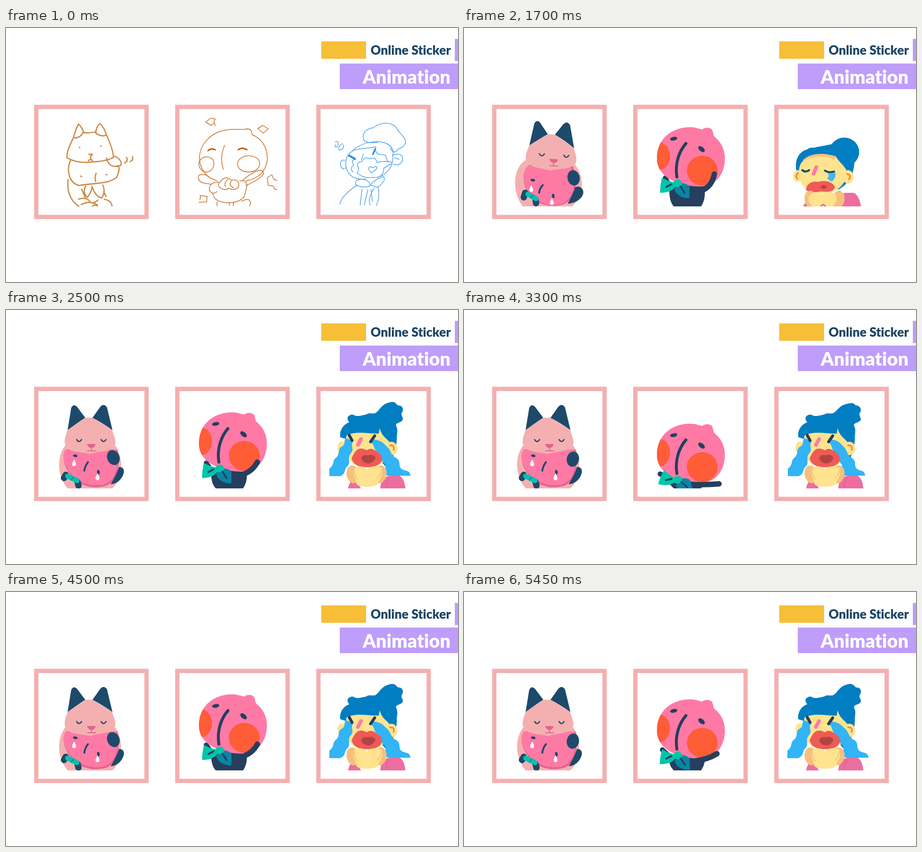
An HTML page with a canvas for the animation above (5.5 s loop, 998 by 561 pixels).

```html
<!DOCTYPE html>
<html lang="en">
<head>
<meta charset="utf-8">
<title>Online Sticker Animation</title>
<style>
html, body { margin: 0; width: 100%; height: 100%; overflow: hidden; background: #fff; }
svg, canvas { position: absolute; left: 0; top: 0; width: 100%; height: 100%; display: block; }
text { font-family: Lato, "Open Sans", sans-serif; font-weight: 900; font-variant-ligatures: none; text-anchor: end; }
</style>
</head>
<body>
<svg viewBox="0 0 998 561">
  <path fill="#f7be38" d="M696 29.500H795V68H696Z"/>
  <path fill="#be9dfb" d="M737 78.500H998V135H737ZM991 24H998V73H991Z"/>
  <text x="982" y="58.500" font-size="27.800" fill="#1c4666">Online Sticker</text>
  <text x="981.500" y="123" font-size="41.200" fill="#fff">Animation</text>
  <g fill="none" stroke="#f4b0b0" stroke-width="9.500">
    <rect x="66.800" y="174.300" width="243.500" height="243"/>
    <rect x="378.300" y="174.300" width="243.500" height="243"/>
    <rect x="689.800" y="174.300" width="243.500" height="243"/>
  </g>
</svg>
<canvas></canvas>
<script>
const LOOP = 5500, STEP = 50, CYCLE = 2000;
const INK = '#1d4a6b', NAVY = '#263f5e', SKIN = '#f4b0b0', PEACH = '#fe7aa5', ROSE = '#e2638f',
  CHEEK = '#ff5c38', TEAL = '#00c6a9', SEA = '#0786a3', HAIR = '#007ec1', FACE = '#ffe38e',
  TAN = '#f6c07c', LIP = '#ef5a55', MAROON = '#b14442', TEAR = '#32b4f6', EAR = '#f4873c',
  DRESS = '#ec6ea0';

const canvas = document.querySelector('canvas');
const ctx = canvas.getContext('2d');
const ratio = window.devicePixelRatio || 1;
canvas.width = 998 * ratio;
canvas.height = 561 * ratio;
let outline = false;

const lerp = (a, b, t) => a + (b - a) * t;

// Eased value from [time, value] pairs
function track(keys, t) {
  let i = 0;
  while (i < keys.length - 1 && t >= keys[i + 1][0]) i++;
  if (i === keys.length - 1) return keys[i][1];
  const [t0, a] = keys[i], [t1, b] = keys[i + 1];
  const u = Math.max(0, (t - t0) / (t1 - t0));
  return lerp(a, b, u * u * (3 - 2 * u));
}

// Blend two paths with the same commands
function mix(a, b, t) {
  const to = b.match(/-?[\d.]+/g);
  let i = 0;
  return a.replace(/-?[\d.]+/g, n => lerp(+n, +to[i++], t).toFixed(2));
}

function fill(d, color) {
  const p = d instanceof Path2D ? d : new Path2D(d);
  ctx.fillStyle = outline ? '#fff' : color;
  ctx.fill(p);
  if (outline) {
    ctx.strokeStyle = color;
    ctx.lineWidth = 2;
    ctx.stroke(p);
  }
}

function line(d, color, width) {
  ctx.strokeStyle = color;
  ctx.lineWidth = width;
  ctx.stroke(new Path2D(d));
}

function oval(x, y, rx, ry, color, rot = 0) {
  const p = new Path2D();
  p.ellipse(x, y, rx, ry, rot, 0, 7);
  fill(p, color);
}

function group(draw, x = 0, y = 0, rot = 0, cx = 0, cy = 0) {
  ctx.save();
  ctx.translate(x + cx, y + cy);
  ctx.rotate(rot * Math.PI / 180);
  ctx.translate(-cx, -cy);
  draw();
  ctx.restore();
}

const drop = (x, y) =>
  fill(`M${x} ${y - 8}C${x + 3} ${y - 2} ${x + 5} ${y + 1} ${x + 4} ${y + 4}C${x + 3} ${y + 8} ${x - 3} ${y + 8} ${x - 4} ${y + 4}C${x - 5} ${y + 1} ${x - 3} ${y - 2} ${x} ${y - 8}Z`, '#fff');

function catHead(turn) {
  fill('M176 238L191 238L234 264C238 278 246 290 239 301C228 314 206 311 186 318C158 313 140 313 132 301C126 290 132 278 136 264Z', SKIN);
  fill('M136 265L144 216Q149 206 157 214L175 238Q158 249 136 265Z', INK);
  fill('M235 265L223 215Q216 205 208 214L191 238Q212 249 235 265Z', INK);
  group(() => {
    line('M156 286Q161 295 167 286M210 286Q215 295 221 286', INK, 2.600);
    fill('M179 296L198 296Q196 304 189 305Q181 304 179 296Z', ROSE);
    line('M188.500 304L188.500 310M180 311L198 311', ROSE, 2);
  }, 4 * turn, -5 * turn);
}

function cat(p) {
  const e = track([[200, 0], [300, 0.200], [550, 1]], p);
  const rot = track([[0, 0], [200, 3.500], [300, 6], [400, 4.500], [550, 0]], p);
  const x = track([[0, 2], [200, 5], [300, 5.500], [550, 0]], p);
  const y = track([[0, -6], [200, -3], [300, -1.500], [550, 0]], p);
  const turn = track([[0, 0.500], [200, 0.800], [300, 1], [550, 0]], p);
  const breath = p > 1150 && p < 1750 ? -Math.sin((p - 1150) / 600 * Math.PI) : 0;
  const pat = (1 - Math.cos((p - 1000) / 583 * Math.PI * 2)) / 2;
  const at = (a, b) => lerp(a, b, e);

  group(() => {
    fill(mix('M136 292C108 308 104 362 131 396L235 396C266 378 270 322 238 294Z',
      'M134 296C112 316 110 368 138 396L232 396C260 376 260 322 240 298Z', e), SKIN);
    fill(mix('M146 302C128 310 126 345 145 368C160 390 192 398 220 389C247 378 253 345 240 304Z',
      'M133 308C123 316 126 345 142 363C160 388 190 397 222 388C247 376 252 345 246 308Z', e), ROSE);
    fill(mix('M144 304C128 314 128 345 146 366C160 386 190 395 212 389C242 380 250 345 236 308Z',
      'M131 309C124 318 127 345 144 362C160 382 190 391 214 386C244 378 250 345 243 308Z', e), PEACH);
    oval(at(152, 153), at(336, 322), 5, 2.800, INK, 0.200);
    oval(at(197, 204), at(371, 358), 3, 5, INK, -0.200);
    line(mix('M174 347Q167 354 166 364', 'M181 336Q174 345 173 355', e), INK, 4);
    drop(at(148.500, 150.500), at(355, 338));
    drop(at(194, 202), at(384, 369));
  }, 0, breath);

  group(() => catHead(turn), x, y + breath, rot, 185, 318);

  fill(mix('M229 388C235 376 243 362 245 352C256 346 266 356 263 367C259 378 246 387 229 388Z',
    'M231 385C236 376 245 362 249 347C258 345 263 354 259 363C254 376 244 384 231 385Z', e), INK);
  oval(at(242, lerp(237, 241, pat)), at(331, lerp(326, 330, pat)), 13.500, 17, INK, lerp(-0.400, 0.300, pat) * e - 0.200 * (1 - e));
  line(mix('M135 364L132 374M158 379L159 387', 'M132 364L128 371M158 380L160 388', e), INK, 14);
  line(mix('M141 367L159 377', 'M136 367L157 377', e), '#0bbfae', 11);
  line(mix('M147 375Q149 371 153 370', 'M144 376Q146 371 150 370', e), SEA, 2);
}

function peach(p) {
  const q = p % 1000;
  const d = track([[0, 0], [100, -7], [200, -7], [300, 2], [500, 20], [650, 28], [800, 25], [950, 11], [1000, 0]], q);
  const flap = track([[200, 0], [300, 9], [500, 15], [800, 16], [1000, 0]], q);
  const k = d / 25;
  fill(`M453 ${358 + d}C453 385 460 390 465 396L522 396C531 384 534 370 530 ${352 + d}L475 ${340 + d}Z`, NAVY);
  line(mix('M442 338L456 358', 'M433 362L456 374', k), NAVY, 11);
  group(() => {
    const head = new Path2D('M426 295C426 250 460 226 500 226C512 226 519 230 526 231C532 226 542 226 547 231C551 236 549 242 553 247C568 259 576 275 576 295C576 330 555 357 522 357C480 357 426 340 426 295Z');
    fill(head, PEACH);
    ctx.save();
    ctx.clip(head);
    oval(429, 290, 26, 31, CHEEK);
    oval(526, 322, 34, 33, CHEEK);
    ctx.restore();
    oval(463, 251.500, 8, 4, NAVY, -0.200);
    oval(524.500, 274.500, 8.500, 5, NAVY, 0.700);
    line('M490 262C476 278 465 305 470 336', NAVY, 6.500);
  }, 0, d);
  line(mix('M520 364Q544 357 555 336', 'M495 385Q530 387 563 384', k), NAVY, 12);
  group(() => {
    fill('M466 348C452 346 444 341 437 338C434 350 433 360 433 371C448 371 460 367 468 356Z', TEAL);
    line('M447 358L458 352', NAVY, 4);
  }, 0, d, flap, 472, 350);
  group(() => {
    fill('M476 350C488 349 494 353 498 358C497 366 499 376 497 383C482 383 468 376 464 362Z', SEA);
    oval(472, 350, 9.500, 8.500, TEAL);
    line('M478 357L487 371', NAVY, 4);
  }, 0, d, -flap, 472, 350);
}

function fists(y) {
  oval(766, 368 + y, 14, 20, TAN, -0.200);
  oval(826, 368 + y, 14, 20, TAN, 0.200);
}

function calmWoman(u) {
  fill('M832 396L832 372Q833 365 842 364L860 364Q872 368 877 396Z', DRESS);
  fill('M749 396Q750 386 760 384L766 396Z', ROSE);
  oval(839.500, 274 - 17 * u, 33, 32, HAIR);
  group(() => {
    fill(mix('M734 315C729 290 741 272 758 268C765 262 772 266 778 263C795 260 805 258 815 256L862 292C862 322 850 345 826 357L790 330Z',
      'M734 313C729 288 738 274 750 268C752 254 766 256 774 259C788 255 800 254 815 249L862 280C862 316 850 345 826 357L790 330Z', u), HAIR);
    oval(736.500, 327, 10, 13, FACE);
    oval(848, 329, 12, 15, FACE);
    line('M738 320Q730 326 736 333M844 322Q857 324 850 334', EAR, 3.500);
    fill('M748 292C765 274 798 276 820 283L826 300L748 300Z', TAN);
    fill('M745 297C765 282 798 279 817 290Q821 287 819 281C827 295 836 300 844 313C848 345 822 366 790 366C755 363 738 345 739 318Q740 305 745 297Z', FACE);
    line('M747 314Q754 320 762 314M797 315Q806 321 817 317', INK, 4.500);
    line('M778 307L772 322', PEACH, 8);
    fill(mix('M803 321L820 319C821 328 819 334 812 339Q805 336 802 332L806 327Z',
      'M800 325Q802 312 823 312C834 320 833 332 825 337Q810 342 800 332L806 328Z', u), '#45b5ee');
    if (u > 0.400) fill('M747 318L761 317Q759 329 752 334Q746 330 747 318Z', '#45b5ee');
    fill(mix('M755 357C756 344 769 337 782 340C795 335 814 339 819 351C817 362 803 363 788 361C775 364 758 363 755 357Z',
      'M757 351C757 335 773 329 786 332C800 326 822 336 825 351C825 364 811 371 792 372C774 374 758 364 757 351Z', u), LIP);
    oval(794, 351, 6, 4, MAROON);
  }, 0, -12 * u);
  fists(11);
  fill('M792 368C780 361 765 362 761 374C759 386 766 393 778 396L808 396C822 390 826 377 820 366C808 360 799 361 792 368Z', FACE);
  line('M788 394Q793 386 798 394', ROSE, 3);
}

function cryingWoman(alt) {
  const s = alt ? 3 : 0;
  fill('M755 396Q757 378 770 372L785 396Z', DRESS);
  fill('M826 396Q828 366 850 366L869 366Q880 372 882 396Z', DRESS);
  line('M840 392Q838 377 848 370', ROSE, 2);
  fill(`M738 281C736 264 746 252 758 248C750 239 755 231 766 231C776 237 783 233 795 231C802 226 808 230 815 228C826 222 828 ${206 + s} 852 ${203 + s}C863 203 862 212 869 211C879 ${213 + s} 877 224 873 229C873 236 879 ${239 + s} 875 244C870 250 861 248 861 255C867 265 862 276 863 284C862 308 854 335 838 346L800 300Z`, HAIR);
  oval(741, 304, 9, 14, FACE);
  oval(851, 306, 13, 15, FACE);
  line('M846 299Q859 297 856 309', EAR, 3.500);
  fill('M752 277C775 266 800 274 823 273L825 261C829 278 840 283 846 291C850 325 832 349 796 349C762 347 740 322 752 277Z', FACE);
  group(() => {
    fill('M751 283C744 290 751 297 741 302C732 306 738 318 729 326C720 331 726 343 714 350L714 367L738 367C752 361 745 352 755 344C762 335 752 326 762 316C770 306 759 300 767 290Z', TEAR);
  }, alt ? 1 : 0);
  ctx.save();
  ctx.translate(803, 0);
  ctx.scale(alt ? 0.920 : 1, 1);
  ctx.translate(-803, 0);
  fill('M804 292C816 297 810 307 820 313C831 320 824 331 836 339C841 349 834 360 842 366L893 366C892 350 875 358 870 347C867 338 872 332 858 325C848 319 852 310 838 299Q828 287 812 286Z', TEAR);
  ctx.restore();
  line('M758 277L764 288M814 278L805 291', NAVY, 6.500);
  line('M784 285L777 298', PEACH, 8);
  fill('M763 328C768 317 773 306 784 306Q791 306 796 310Q805 303 815 310C824 315 830 321 831 328C829 342 813 348 796 347C780 347 767 342 763 328Z', LIP);
  fill('M784 328Q787 318 799 321Q810 317 816 326Q812 338 800 339Q788 338 784 328Z', MAROON);
  fists(-5);
  fill('M797 353C790 343 777 344 769 350C763 362 773 372 774 385C780 392 814 392 820 385C825 374 833 365 830 350C820 342 804 344 797 353Z', FACE);
  line('M769 352Q767 362 776 373M829 352Q828 363 820 371', TAN, 2);
}

function woman(p) {
  if (p < 450) calmWoman(track([[0, 0.500], [120, 0], [200, 0], [300, 1], [400, 1.300]], p));
  else cryingWoman(Math.round(p / STEP) % 6 < 2);
}

function sketch() {
  line(`M149 242Q153 226 160 212Q168 220 171 229Q166 242 152 243M198 232Q199 218 207 211Q216 218 222 236Q212 242 198 232M171 231Q185 233 199 229
    M150 240Q132 275 135 287Q160 300 187 296Q220 295 237 286Q238 272 221 234M162 264L163 264M209 261L210 261
    M183 279L191 279L187 283L187 290M182 293Q187 288 191 293
    M143 291C134 310 136 340 161 348C190 342 225 346 244 330C253 312 249 304 246 304M165 327L167 328M221 324L223 324
    M199 321Q195 330 198 339M222 287C225 300 232 308 248 305C260 304 254 289 240 283
    M262 298Q271 293 266 286M274 295Q282 292 279 284
    M137 335C134 365 145 386 165 396M176 349Q168 365 180 374Q190 360 190 350Q199 375 212 375Q220 360 214 347M167 356L176 377
    M160 378Q180 372 186 385Q195 388 203 380M166 390Q185 380 202 391M188 396Q199 386 203 396M217 378Q235 382 234 396M216 362L221 372`, '#cd8b48', 2.800);
  line(`M450 331C415 305 420 252 468 230C490 222 510 224 526 224Q536 221 541 226L544 236C580 250 588 300 560 325C550 332 540 336 530 338M450 331L465 337
    M483 259Q471 285 480 312M459 300C458 325 426 323 426 300C427 279 461 280 459 300M560 300C559 324 512 324 511 300C514 276 561 277 560 300
    M450 331Q442 320 426 325Q421 336 434 342L452 345M522 337Q545 316 562 314Q574 318 564 328Q548 341 529 348
    M473 340Q484 324 497 336Q516 333 514 350Q505 361 493 354Q480 361 471 351Q466 344 473 340M490 334Q480 344 485 350M498 338Q490 346 502 353
    M469 340Q448 341 449 358Q456 370 466 361M516 338Q532 334 532 350L526 372Q516 386 490 386Q458 384 457 366
    M466 384L466 393M492 386L494 392M502 386L502 393M520 383Q538 373 540 386L538 393
    M462 216L459 207L462 201L452 199L441 208L453 215L459 210M556 222L567 215L579 223L568 232Z
    M428 370L444 372L443 384L426 385M430 371L428 379M578 330L587 324L591 334L598 337M577 331L579 348L590 349L593 356L598 357`, '#c46c22', 1.500);
  line('M446 271Q453 264 462 269M513 269Q521 262 532 269', '#b8560f', 3);
  line(`M792 250C782 235 795 222 812 220C825 208 850 206 862 220C866 232 884 240 882 254C875 270 865 262 862 273Q852 276 849 265M792 250Q806 256 820 252
    M765 272C780 254 820 245 842 256Q858 266 854 282C856 305 842 324 820 330M765 272C744 282 746 318 766 329Q780 336 794 333M765 271C785 264 800 267 817 262M789 278L785 291
    M758 280L772 288Q760 294 768 302Q758 310 766 318M815 270L820 278L838 281L842 294L852 297M748 292Q737 290 739 303Q742 315 750 309M853 281Q876 274 876 290Q872 306 855 301M858 287L868 290
    M775 320Q782 312 776 304Q775 296 786 295Q792 282 803 289Q816 283 819 297Q835 293 850 296M775 320Q790 333 808 330Q835 332 834 310L850 300M806 320C796 308 803 303 810 309C817 302 828 308 806 320
    M772 346Q770 334 786 334Q806 337 803 349Q790 355 772 346M805 347Q810 336 834 328Q840 338 820 352Z
    M776 347Q742 368 737 389M786 356L782 391M799 357L791 391M813 354Q798 376 804 391M806 357L809 384M822 352Q826 373 818 392
    M727 252Q736 246 732 262Q725 266 727 258M743 255Q731 264 736 270Q747 268 745 258`, '#4aa2ee', 1.500);
  line('M757 282L771 290M816 266L810 279', '#1d7fe0', 3);
}

function render(t) {
  ctx.setTransform(ratio, 0, 0, ratio, 0, 0);
  ctx.clearRect(0, 0, 998, 561);
  ctx.lineCap = ctx.lineJoin = 'round';
  ctx.save();
  ctx.beginPath();
  ctx.rect(72, 180, 860, 214);
  ctx.clip();
  if (t < 500) {
    sketch();
  } else {
    const moving = t >= 1500;
    const p = moving ? (t - 1500) % CYCLE : 0;
    outline = t < 1050;
    cat(p);
    peach(p);
    if (moving) woman(p);
    else cryingWoman(false);
    outline = false;
  }
  ctx.restore();
}

const start = performance.now();
function tick(now) {
  const t = Math.max(0, now - start) % LOOP;
  render(Math.floor(t / STEP) * STEP);
  requestAnimationFrame(tick);
}
render(0);
requestAnimationFrame(tick);
</script>
</body>
</html>
```
